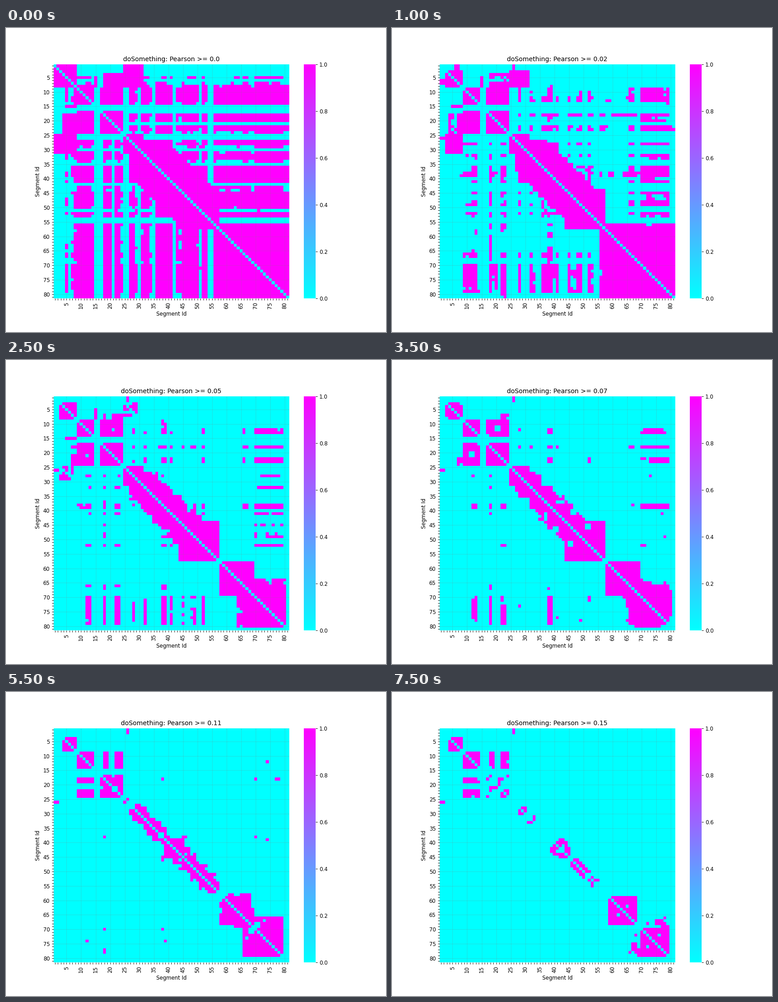
A matplotlib script that plays this animation: 837x669 px, repeating every 8 s.

```python
import numpy as np
import matplotlib.pyplot as plt
from matplotlib.animation import FuncAnimation

W, H, DPI = 837, 669, 83.7
N = 81
STEPS, INTERVAL = 16, 500

# Groups on the diagonal: first, last, strength
CLUSTERS = [
    (1, 8, 1.6), (3, 8, 8), (4, 8, 24), (9, 14, 24), (17, 24, 13),
    (25, 31, 12), (28, 41, 3.5), (36, 53, 1.8), (44, 57, 9), (56, 81, 3.2),
    (58, 69, 10), (59, 68, 20), (64, 80, 6.5), (66, 79, 12), (70, 79, 25),
]

# Groups linked across the diagonal: rows, columns, strength
LINKS = [
    (1, 3, 25, 31, .6), (1, 2, 26, 26, 24), (3, 8, 25, 31, 4.5),
    (4, 8, 18, 24, 2), (7, 8, 18, 24, 6), (5, 8, 15, 15, 6),
    (9, 14, 17, 24, 8), (9, 14, 18, 19, 17), (9, 14, 22, 24, 19),
    (38, 40, 45, 46, 11),
]

# Segments that stand out from the faint background
WEIGHTS = {
    .7: [19, 20, 33, 40, 46, 47, 53, *range(56, 66), 68, 69, 80, 81],
    1.2: [9, 10, 11, 36, 37],
    1.6: [45, 48, 49],
    2.1: [28, 32, 41, 52, 66, 67],
    2.7: [12, 13, 22, 23],
    3: [38, 39, *range(70, 80)],
    3.6: [18],
}
QUIET = [1, 2, 3, 4, 6, 15, 16, 17, 21, 25, 26, 30, 35, 42, 54, 55]


def build():
    rng = np.random.default_rng(4)

    # Every pair starts from the product of its two weights
    q = rng.uniform(0, .5, N + 1)
    for weight, segments in WEIGHTS.items():
        q[segments] = weight
    q[QUIET] = -1
    q = q[1:]
    level = np.where(np.minimum.outer(q, q) > 0, np.outer(q, q) - .15, -1)

    # Neighbours fade with distance in the middle of the diagonal
    i, j = np.indices((N, N)) + 1
    middle = (np.minimum(i, j) >= 27) & (np.maximum(i, j) <= 57)
    fade = 16 - 1.3 * abs(i - j)
    level = np.where(middle, np.maximum(level, fade), level)

    groups = [(a, b, a, b, v) for a, b, v in CLUSTERS] + LINKS
    for r0, r1, c0, c1, v in groups:
        box = level[r0 - 1:r1, c0 - 1:c1]
        np.maximum(box, v, out=box)

    # Blotchy noise that grows with the strength
    g = rng.normal(size=(N, N))
    g = (g + np.roll(g, 1, 0) + np.roll(g, 1, 1) + np.roll(g, 1, (0, 1))) / 2
    level += g * (.08 + .18 * np.maximum(level, 0))
    level = np.triu(level, 1)
    level += level.T
    np.fill_diagonal(level, -1)
    return level


level = build()

fig, ax = plt.subplots(figsize=((W + .01) / DPI, (H + .01) / DPI), dpi=DPI)
mesh = ax.pcolormesh(np.zeros((N, N)), cmap="cool", vmin=0, vmax=1)
ax.set(xlim=(0, N), ylim=(N, 0), xlabel="Segment Id", ylabel="Segment Id")
ax.spines[:].set_visible(False)

bar = fig.colorbar(mesh, ax=ax)
bar.outline.set_linewidth(0)

ids = np.arange(5, N, 5)
ax.set_xticks(ids - .5, ids, rotation=90)
ax.set_yticks(ids - .5, ids)
ax.set_xticks(np.arange(N) + .5, minor=True)
ax.set_yticks(np.arange(N) + .5, minor=True)
ax.tick_params(which="minor", length=3.5, width=.8)
ax.grid(which="major", color="gray", linewidth=.5, alpha=.4)

title = ax.set_title("")


def draw(k):
    mesh.set_array((level >= k).astype(float))
    title.set_text(f"doSomething: Pearson >= {k / 100}")
    return mesh, title


anim = FuncAnimation(fig, draw, frames=STEPS, interval=INTERVAL,
                     init_func=lambda: draw(0), repeat=True, repeat_delay=0)
plt.show()
```
